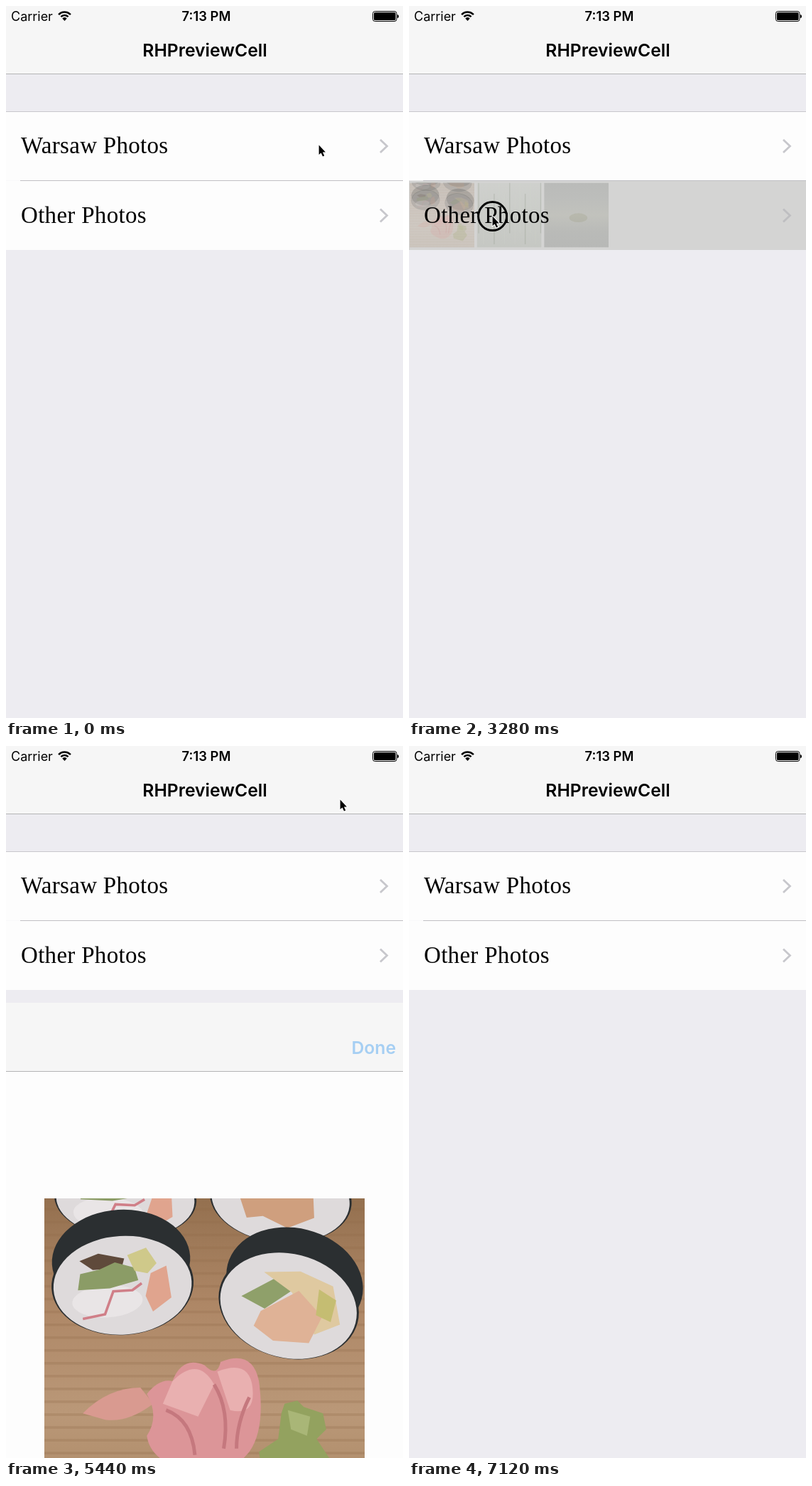
These frames come from a looping animation (559 px wide and 1001 px high, 7200 ms). An HTML page with a canvas:

```html
<!DOCTYPE html>
<html lang="en">
<head>
<meta charset="utf-8">
<title>RHPreviewCell</title>
<style>
  html, body { margin: 0; width: 100%; height: 100%; overflow: hidden; background: #edecf1; }
  canvas { display: block; }
</style>
</head>
<body>
<canvas id="stage" width="559" height="1001"></canvas>
<script>
const ctx = document.getElementById('stage').getContext('2d');
const W = 559, H = 1001, LOOP = 7200, STEP = 80;
const NAV = 96, ROW_TOP = 148, ROW_H = 97.5, TILE = 93.2;
const PAPER = '#fdfdfd', BAR = '#f6f6f6', LINE = '#b4b4b6', GREY = '#c7c7cc', BLUE = '#107be8';

const clamp = v => Math.min(1, Math.max(0, v));
const settle = u => u <= 0 ? 0 : u > 450 ? 1 : 1 - Math.exp(-u / 89.5);
const between = (t, a, b) => t >= a && t < b;

// Pointer: time, x, y
const path = [
  [0, 441, 196], [640, 441, 197], [1280, 62, 204], [1840, 427, 209], [2160, 427, 209],
  [2880, 118, 296], [3280, 118, 296], [3760, 238, 298], [4240, 62, 296], [4400, 62, 296],
  [4640, 133, 254], [5120, 514, 66], [5360, 514, 66], [5440, 471, 76], [5840, 155, 191],
  [6080, 155, 191], [6480, 24, 62], [6720, 24, 62], [LOOP, 60, 80]
];
const touches = [[480, 2200], [2960, 4400], [5200, 5400], [5880, 6000], [6520, 6640]];

function pointerAt(t) {
  const i = path.findIndex(k => k[0] > t);
  const [t0, x0, y0] = path[i - 1], [t1, x1, y1] = path[i];
  const u = (t - t0) / (t1 - t0), e = u * u * (3 - 2 * u);
  return { x: x0 + (x1 - x0) * e, y: y0 + (y1 - y0) * e };
}

function rect(color, x, y, w, h) {
  ctx.fillStyle = color;
  ctx.fillRect(x, y, w, h);
}
function oval(color, x, y, rx, ry, turn = 0) {
  ctx.fillStyle = color;
  ctx.beginPath();
  ctx.ellipse(x, y, rx, ry, turn, 0, 7);
  ctx.fill();
}
function stroke(color, width, d) {
  ctx.strokeStyle = color;
  ctx.lineWidth = width;
  ctx.stroke(new Path2D(d));
}
function shape(color, d) {
  ctx.fillStyle = color;
  ctx.fill(new Path2D(d));
}
function fade(...colors) {
  const g = ctx.createLinearGradient(0, 0, 0, 100);
  colors.forEach((c, i) => g.addColorStop(i / (colors.length - 1), c));
  rect(g, 0, 0, 100, 100);
}
function text(str, x, y, font, color = '#000', align = 'left') {
  ctx.font = font;
  ctx.fillStyle = color;
  ctx.textAlign = align;
  ctx.fillText(str, x, y);
}
function layer(x, y, alpha, draw) {
  ctx.save();
  ctx.translate(x, y);
  ctx.globalAlpha *= alpha;
  draw();
  ctx.restore();
}
const sans = (size, weight = 600) => `${weight} ${size}px Inter, sans-serif`;
const serif = '33px "Liberation Serif", serif';

// Pictures are drawn in a 100 x 100 box.
function winterPark() {
  fade('#c9ccd1', '#bcbec1', '#a2a3a4');
  for (let i = 0; i < 9; i++)
    stroke('#9a9da1', 1, `M${i * 12} 75Q${i * 12 + 9} 40 ${i * 14 - 8} 0`);
  rect('#8ea6ba', 32, 72, 28, 22);
  rect('#b08e86', 64, 72, 7, 24);
  rect('#7893aa', 78, 62, 12, 34);
}
function darkGarden() {
  fade('#8a8b89', '#3c3e3c', '#222422', '#262826', '#3c3e3c', '#4a4b4a');
  oval('#a9abaa', 65, 72, 16, 4);
  rect('#8f9190', 57, 76, 16, 17);
}
function plane() {
  fade('#b9cad5', '#d3dde2', '#c3d2d6');
  oval('#e2e7e8', 22, 70, 30, 13);
  shape('#5a6874', 'M34 39L82 30Q90 29 88 33L40 44ZM60 34L46 8L52 8L72 32ZM56 38L68 66L74 65L72 36ZM38 41L31 29L35 29L44 40Z');
}
function nightLights() {
  fade('#3a6c9c', '#4f7dA8', '#8aa3b6', '#c5c3bd', '#a9a197');
  stroke('#7fa0bb', 1, 'M0 8L100 34M0 22L100 42');
  rect('#efeeea', 0, 57, 100, 10);
  rect('#c9c5bd', 0, 67, 66, 14);
  rect('#5f86ac', 66, 68, 34, 17);
  oval('#f0d9a4', 86, 38, 3, 3);
  oval('#efe2c0', 18, 52, 4, 3);
}
function sushi() {
  fade('#94704f', '#ae8766', '#ba9878', '#a98662');
  for (let y = 3; y < 100; y += 4) rect('#8f694a44', 0, y, 100, .8);
  const roll = (x, y, ry, turn, fill) => layer(x, y, 1, () => {
    ctx.rotate(turn);
    oval('#2b2f31', 0, -7.5, 21.6, ry);
    oval('#2b2f31', 0, 0, 22.2, ry);
    oval('#dedadb', 0, .3, 21.6, ry - .4);
    fill();
  });
  const vegetables = () => {
    oval('#e9e5e6', -5, 5, 11, 5);
    shape('#5f4a3b', 'M-13 -8L-7 -10L1 -8L0 -5L-9 -5Z');
    shape('#8b9c66', 'M-13 -4L-7 -5L-2 -7L4 -5L5 -1L-4 1L-14 1Z');
    shape('#cfc98a', 'M2 -9L8 -11L11 -6L8 -3L4 -4Z');
    shape('#e0a48e', 'M9 -3L14 -5L15 5L9 9L7 4Z');
    stroke('#d07f88', .8, 'M-13 10L-6 9L-3 2L3 2L6 0');
  };
  const crab = () => {
    shape('#8fa06a', 'M-15 1L-4 -9L3 -8L-7 3Z');
    shape('#dfc9a0', 'M-10 -8L1 -11L12 -9L17 2L10 7L0 -4Z');
    shape('#dfb296', 'M-8 4L2 -5L11 1L9 10L-2 12L-9 9Z');
    shape('#c5bd72', 'M8 -7L14 -5L14 2L9 1Z');
  };
  roll(25.3, 0, 12.5, .05, vegetables);
  roll(73.8, 0, 13.8, .1, () => shape('#cf9f7e', 'M-14 -2L10 -2L11 5L3 9L-5 6L-10 7Z'));
  roll(24.4, 26.8, 15.8, -.06, vegetables);
  roll(76.3, 33.2, 16.6, .25, crab);
  shape('#d99a90', 'M12 67Q20 59 30 59L34 64Q26 70 19 69Z');
  shape('#dc9598', 'M32 61Q36 56 40 57Q43 49 50 52Q54 56 55 51Q65 47 67 57Q69 72 64 79Q54 91 42 84Q33 81 32 74Q36 68 32 61Z');
  shape('#e9b0b0', 'M40 57Q48 49 53 58L48 68L37 64ZM54 54Q64 50 65 59Q66 68 58 66Z');
  stroke('#c5787e', 1.1, 'M38 66Q46 69 47 80M53 58Q58 66 56 78M64 62Q60 70 60 78');
  shape('#93a25f', 'M74 67L75 64L79 63L81 65L87 67L88 72L85 75L89 81L82 90L68 86L67 79L73 75Z');
  shape('#a9b677', 'M76 66L83 68L82 74L77 72Z');
}
function birches() {
  fade('#b9c0b4', '#a3ad9b', '#87927f');
  for (let i = 0; i < 13; i++)
    rect(i % 3 ? '#cdd2c8' : '#6d7666', i * 8 + 2, (i * 17) % 34, 1.5, 78);
}
function duskForest() {
  fade('#4a504a', '#5a6058', '#74775f', '#4a5046', '#3f443e');
  oval('#8f8c6a', 53, 54, 14, 7);
}

const rows = [
  { label: 'Warsaw Photos', press: 480, release: 2200, photos: [winterPark, darkGarden, plane, nightLights] },
  { label: 'Other Photos', press: 2960, release: 4400, photos: [sushi, birches, duskForest] }
];

function picture(draw, x, y, size, alpha) {
  layer(x, y, alpha, () => {
    ctx.beginPath();
    ctx.rect(0, 0, size, size);
    ctx.clip();
    ctx.scale(size / 100, size / 100);
    draw();
  });
}

function drawRow(row, i, t, pointer, selected) {
  const y = ROW_TOP + i * ROW_H, held = between(t, row.press, row.release);
  rect(PAPER, 0, y, W, ROW_H);
  layer(0, 0, held ? 1 : selected, () => rect('#d4d4d3', 0, y, W, ROW_H));
  if (held) {
    const shown = clamp((t - row.press - 80) / 560);
    const focusing = clamp((t - row.press - 400) / 300);
    row.photos.forEach((draw, n) => {
      const focus = clamp(1.5 - Math.abs(pointer.x - (n + .5) * TILE) / TILE);
      picture(draw, n * 94.6 + 1, y + 3, 91, shown * .45 + focus * focusing * .5);
    });
  }
  ctx.letterSpacing = '.3px';
  text(row.label, 21, y + 59, serif);
  ctx.letterSpacing = '0px';
  stroke(held ? '#bebec1' : GREY, 2.8, `M527 ${y + 40}l9.5 9l-9.5 9`);
}

function drawList(t, pointer, push) {
  const selected = between(t, 5920, 6640) ? 1 : t >= 6640 ? push : 0;
  layer(-.3 * W * push, 0, 1, () => {
    rect('#edecf1', 0, 0, W * 1.3, H);
    rows.forEach((row, i) => drawRow(row, i, t, pointer, i ? 0 : selected));
    rect('#c8c7cc', 0, ROW_TOP, W, 1);
    rect('#c0bfc4', 20, 245, W, 1);
  });
  if (push) rect(`rgba(0,0,0,${.1 * push})`, 0, 0, W, H);
}

function drawSpinner(x, y, t) {
  const head = Math.floor(t / 80) + 9;
  ctx.lineCap = 'round';
  for (let i = 0; i < 12; i++) {
    const age = (head - i + 8) % 12;
    layer(x, y, 1, () => {
      ctx.rotate(i * Math.PI / 6);
      const v = Math.min(226, 150 + age * 11);
      stroke(`rgb(${v},${v},${v})`, 2.8, 'M0 -7.5V-13.5');
    });
  }
  ctx.lineCap = 'butt';
}

function drawPushed(t, push) {
  const x = W * (1 - push);
  const g = ctx.createLinearGradient(x - 14, 0, x, 0);
  g.addColorStop(0, 'rgba(0,0,0,0)');
  g.addColorStop(1, `rgba(0,0,0,${.13 * (1 - push * .5)})`);
  rect(g, x - 14, 0, 14, H);
  rect(PAPER, x, 0, W, H);
  drawSpinner(x + 282, 500, t);
}

function drawNav(push) {
  rect(BAR, 0, 0, W, NAV);
  rect(LINE, 0, NAV - 1, W, 1);
  const x = 280 - 143 * push;
  layer(0, 0, clamp(1 - 1.2 * push), () => text('RHPreviewCell', x, 71, sans(24.7), '#000', 'center'));
  layer(0, 0, clamp((push - .55) / .45), () => {
    stroke(BLUE, 4, 'M28 47L13 62L28 77');
    text('RHPreviewCell', x, 71, sans(24.7, 400), BLUE, 'center');
  });
}

function drawModal(t, rise) {
  layer(0, Math.round(H * (1 - rise)), 1, () => {
    rect(PAPER, 0, 0, W, H);
    rect(BAR, 0, 0, W, NAV);
    rect(LINE, 0, NAV, W, 1);
    text('Done', 549, 72, sans(24.7), t >= 5200 ? '#a6cff3' : BLUE, 'right');
    if (t >= 4960) picture(sushi, 54, 275, 451, 1);
  });
}

function drawStatus() {
  text('Carrier', 7, 21, sans(18, 400));
  text('7:13 PM', 282, 21, sans(18.4), '#000', 'center');
  for (const r of [11.5, 7]) {
    ctx.beginPath();
    ctx.arc(82.5, 20, r, -Math.PI * .76, -Math.PI * .24);
    ctx.strokeStyle = '#000';
    ctx.lineWidth = 2.5;
    ctx.stroke();
  }
  shape('#000', 'M82.5 21L79.3 17.4Q82.5 14.8 85.7 17.4Z');
  ctx.beginPath();
  ctx.roundRect(516.5, 7.5, 33.5, 14, 3);
  ctx.lineWidth = 1;
  ctx.stroke();
  ctx.beginPath();
  ctx.roundRect(518, 9, 30.5, 11, 1.5);
  ctx.fill();
  shape('#000', 'M551 12Q553 12 553 14.5Q553 17 551 17Z');
}

function drawPointer(t, { x, y }) {
  layer(x - .4, y - .4, 1, () => {
    if (touches.some(([a, b]) => between(t, a, b))) {
      ctx.beginPath();
      ctx.arc(0, 0, 20, 0, 7);
      ctx.strokeStyle = '#000';
      ctx.lineWidth = 3;
      ctx.stroke();
    }
    const arrow = 'M0 0V13.5L3 10.8L5.4 16L7.6 15L5.3 10H9.3Z';
    stroke('#fff', 2, arrow);
    shape('#000', arrow);
  });
}

function render(t) {
  const pointer = pointerAt(t);
  const rise = t < 5400 ? settle(t - 4479) : 1 - settle(t - 5400);
  const push = t < 6640 ? settle(t - 6000) : 1 - settle(t - 6640);
  drawList(t, pointer, push);
  if (push) drawPushed(t, push);
  drawNav(push);
  if (rise) drawModal(t, rise);
  drawStatus();
  if (t < 6960) drawPointer(t, pointer);
}

let start;
function tick(now) {
  start ??= now;
  render(Math.floor((now - start) % LOOP / STEP) * STEP);
  requestAnimationFrame(tick);
}
render(0);
requestAnimationFrame(tick);
</script>
</body>
</html>
```
